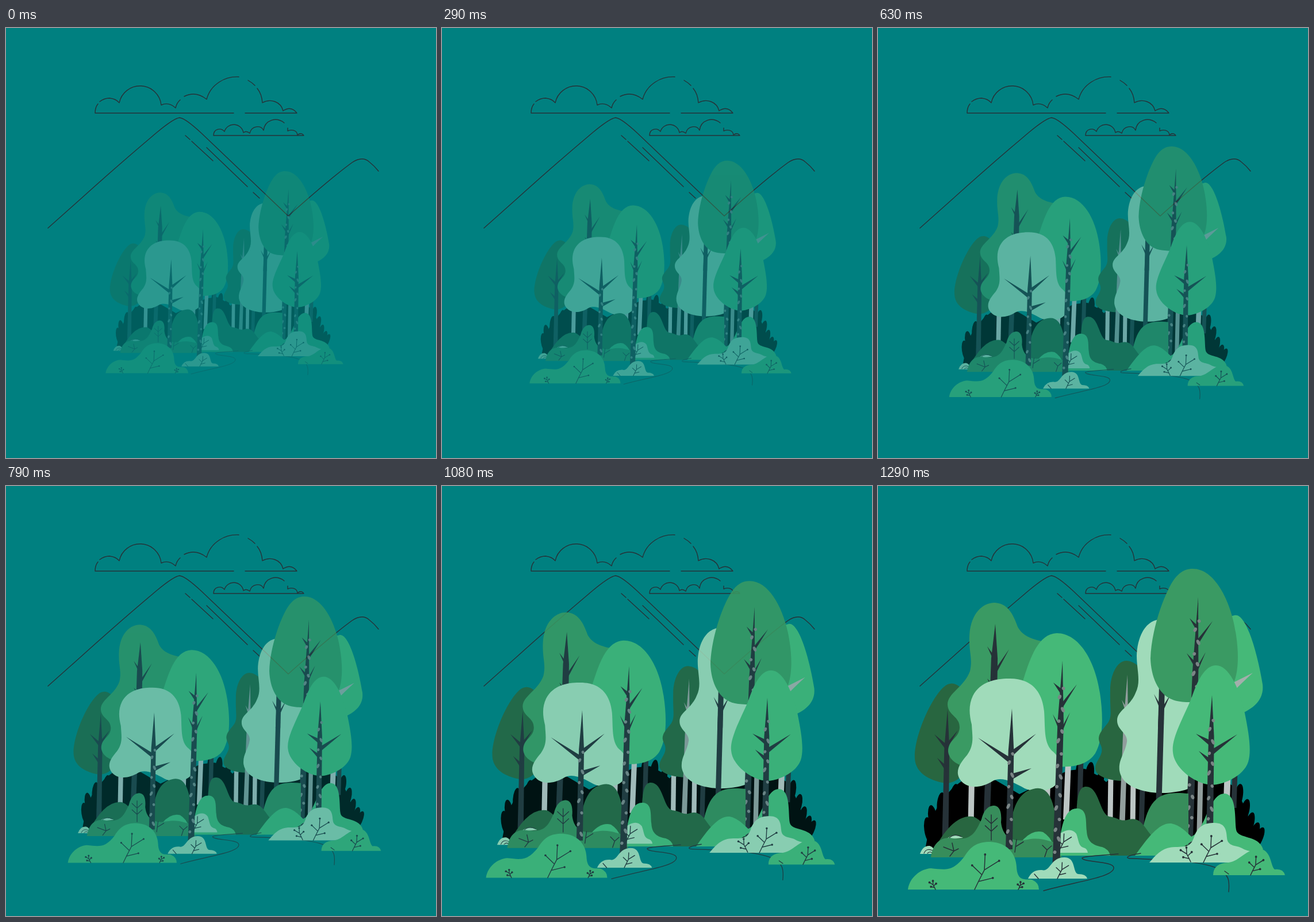
Write an HTML page that moves like this. It is 748 px wide and 748 px high and loops after 1330 ms.

```html
<!DOCTYPE html>
<html>
<head>
<meta charset="utf-8">
<style>
html, body { margin: 0; width: 100%; height: 100%; overflow: hidden; background: #008080 }
svg { display: block; width: 100vw; height: 100vh }
</style>
</head>
<body>
<svg viewBox="0 0 748 748"><g id="sky"></g><g id="forest"></g></svg>
<script>
const INK = '#263238', LIGHT = '#a0dbba', BRIGHT = '#45b978', MID = '#3a9a63',
      MOSS = '#378d5b', DARK = '#286640', PALE = '#bcc5c4', GREY = '#929e9d';

const shape = (color, d) => `<path fill="${color}" d="${d}"/>`;
const line = (d, w = 1.4) =>
  `<path fill="none" stroke="${INK}" stroke-width="${w}" stroke-linecap="round" stroke-linejoin="round" d="${d}"/>`;
const oval = (x, y, rx, ry, color, turn = 0) =>
  `<ellipse cx="${x}" cy="${y}" rx="${rx}" ry="${ry}" fill="${color}" transform="rotate(${turn} ${x} ${y})"/>`;

// Plain pole between two points
const pole = (x1, y1, x2, y2, w, color = INK) =>
  shape(color, `M${x1 - w / 2} ${y1}h${w}L${x2 + w / 2} ${y2}h${-w}Z`);

// Tapered trunk; each branch is [tip x, tip y, join y]
function trunk(tx, ty, bx, by, w, branches = [], spotsFrom = 0, color = INK) {
  const at = y => tx + (bx - tx) * (y - ty) / (by - ty);
  const my = ty + (by - ty) * .3, mx = at(my);
  let out = shape(color, `M${tx} ${ty}L${mx + w * .4} ${my}L${bx + w / 2} ${by}h${-w}L${mx - w * .4} ${my}Z`);
  for (const [x, y, jy] of branches)
    out += shape(color, `M${x} ${y}L${at(jy)} ${jy - 5}V${jy + 6}Z`);
  if (spotsFrom)
    for (let y = spotsFrom, k = 0; y < by - 8; y += 15 + k * 7 % 9, k++)
      out += oval(at(y) + (k % 2 ? -1 : 1) * w * .24, y, w * .22, 3 + k % 3, '#7b8586', k % 2 ? 25 : -25);
  return out;
}

// Small plant: bent stem with three side shoots
function sprig(x, y, h, flip = 1, dots = true) {
  const p = (u, v) => [x + u * h * flip, y + v * h];
  const ends = [[.3, -1], [.7, -.82], [.52, -.33], [-.07, -.69]].map(e => p(...e));
  const joins = [[.28, -.56], [.28, -.56], [.11, -.23], [.2, -.43]].map(j => p(...j));
  let d = `M${x} ${y}L${p(.11, -.23)}L${p(.28, -.56)}`;
  ends.forEach((e, k) => d += `M${joins[k]}L${e}`);
  return line(d, 1.5) + (dots ? ends.map(e => oval(e[0], e[1], 1.9, 1.9, INK)).join('') : '');
}

// Upright plant with paired shoots
const fern = (x, y, h) => line(`M${x} ${y}v${-h}` + [.35, .65].map(f =>
  `M${x - h * .24} ${y - h * (f + .22)}L${x} ${y - h * f}L${x + h * .24} ${y - h * (f + .22)}`).join(''), 1.5);

sky.innerHTML = line(`M73 348L128 299Q200 234 262 182Q292 157 302 156Q312 157 340 183L491 327Q565 261 602 234Q620 222 632 233Q641 240 648 249
  M312 187l8 7M323 197l37 34M349 208l71 68M430 286l11 10
  M155 148H396M416 148H506M155 148Q155 138 160 132M163 128Q171 122 180 122Q191 123 197 130A37 37 0 0 1 270 134Q283 128 295 139Q297 130 303 125
  M310 119Q330 109 349 124Q354 105 371 94Q386 84 405 85M421 91Q428 95 433 100M437 105Q445 115 446 130C460 122 478 128 482 144Q496 135 506 148
  M361 187H518M361 187C361 175 374 173 380 180A17 17 0 0 1 413 182Q418 178 424 183C427 170 444 168 448 178C450 160 470 154 484 165M490 174v5C498 176 506 178 507 186Q514 181 518 187`);

const blades = [[88, 598, -8], [95, 577, -8], [110, 555, 4], [133, 540, 8], [352, 503, -6], [368, 502, 8], [384, 518, 15],
  [397, 532, 18], [627, 540, 10], [638, 566, 14], [646, 589, 16], [654, 606, 20], [661, 614, 25]];

forest.innerHTML = [
  // undergrowth
  shape('#000', 'M82 632L92 580L108 550L130 525L150 510L205 512L246 536L330 495L360 492L385 505L403 520L420 500H570L615 520L634 550L650 590L662 622L640 632Z'),
  ...blades.map(([x, y, turn]) => oval(x, y, 7.5, 22, '#000', turn)),
  // rear poles
  pole(192, 500, 189, 580, 11), pole(163, 510, 161, 615, 10, PALE),
  pole(331, 480, 327, 580, 10, PALE), pole(353, 475, 351, 550, 9), pole(295, 515, 292, 615, 10, PALE),
  pole(405, 500, 404, 578, 9, PALE), pole(444, 515, 443, 590, 9, PALE), pole(460, 525, 458, 595, 9),
  pole(561, 510, 559, 600, 9, GREY), pole(608, 505, 606, 560, 11, PALE), pole(621, 495, 619, 560, 9),
  // left trees
  shape(DARK, 'M125 344C103 346 62 430 64 474C66 505 100 514 117 517C140 517 150 500 160 480V370Q140 340 125 344Z'),
  trunk(121, 388, 117, 612, 11, [[98, 432, 455], [103, 473, 492], [139, 425, 452]]),
  shape(MID, 'M203 203C180 203 160 225 159 262C158 290 165 300 160 322C150 350 121 360 121 380C122 400 142 400 142 420C141 440 122 440 122 462C124 480 145 488 160 490L260 480L290 271C262 266 250 258 243 245C235 222 225 204 203 203Z'),
  trunk(204, 240, 199, 440, 14, [[228, 284, 327], [190, 279, 301], [190, 335, 352]]),
  shape(BRIGHT, 'M311 256C350 256 378 305 386 360C392 400 392 440 378 465C365 485 340 490 310 488L240 440L250 345C262 310 275 257 311 256Z'),
  shape(LIGHT, 'M227 335C262 334 285 352 289 392C291 420 288 445 302 460C318 472 322 490 315 512C305 532 275 535 255 526C235 515 215 505 200 513C180 526 155 528 143 511C132 495 145 480 155 468C168 450 164 435 163 415C158 395 158 380 165 365C178 340 205 335 227 335Z'),
  // right trees
  shape(DARK, 'M432 304C415 304 404 330 404 355C403 390 408 400 400 412C390 425 384 430 384 440C385 450 391 452 389 463C386 475 378 480 378 492C379 505 400 512 425 513L460 500V320Q445 304 432 304Z'),
  trunk(434, 328, 424, 605, 10, [[424, 372, 390], [442, 370, 395]], 0, GREY),
  shape(LIGHT, 'M490 232C463 235 451 265 450 295C450 320 458 340 448 360C438 385 416 390 416 408C416 425 435 430 433 445C430 465 418 475 420 495C425 525 465 535 500 534C520 533 545 528 550 520V250Z'),
  pole(494, 348, 487, 605, 10), trunk(494, 345, 492, 420, 10, [[480, 362, 388], [509, 362, 393]]),
  shape(BRIGHT, 'M620 225C640 219 660 290 669 345C672 370 655 385 636 394L560 420V240Z'),
  shape('#a3afab', 'M652 325L618 342L612 330V364Q630 345 652 325Z'),
  shape(MID, 'M547 144C585 143 615 200 623 260C629 300 628 350 600 366C580 378 540 378 520 374C490 368 475 335 474 300C475 260 490 210 505 180C517 155 530 144 547 144Z'),
  trunk(557, 193, 541, 625, 13, [[582, 235, 274], [542, 230, 247], [570, 289, 325], [537, 291, 312]], 235),
  shape(BRIGHT, 'M588 312C610 312 628 350 638 395C645 430 650 460 644 480C636 505 600 520 580 520C550 518 515 490 513 463C510 440 530 405 545 370C555 340 568 312 588 312Z'),
  // rear bushes
  shape(DARK, 'M228 620C230 560 245 532 270 527C302 518 310 560 313 620Z'),
  shape(DARK, 'M92 643Q128 570 165 575Q180 580 190 600V643Z'),
  shape(MOSS, 'M458 610C470 540 490 530 540 535V625Z'),
  shape(DARK, 'M345 643C345 560 343 523 362 523C385 523 385 570 402 575C420 577 420 585 437 580C460 575 465 600 480 612L465 643Z'),
  shape(BRIGHT, 'M545 610C570 600 575 535 603 535C625 537 620 580 623 598C626 615 662 606 670 632L640 650H560Z'),
  trunk(581, 364, 577, 605, 12, [[625, 432, 464], [553, 431, 448], [558, 461, 480]], 408),
  shape(BRIGHT, 'M447 643C470 610 490 585 510 587C525 590 535 600 550 615L510 643Z'),
  shape(BRIGHT, 'M250 618Q268 597 287 602Q300 610 305 625Z'),
  shape(LIGHT, 'M73 640Q78 625 90 626Q98 628 100 640ZM118 615Q132 602 148 612Z'),
  line('M80 639Q84 629 95 634M86 639q4-4 8-1M124 612q9-8 21-2', 1.1),
  shape(MOSS, 'M92 646C95 625 105 612 125 612C165 620 170 600 180 580C185 560 195 556 202 556C215 557 215 575 214 585C217 612 235 620 260 615C285 610 300 620 310 620L320 646Z'),
  fern(197, 616, 44),
  line('M125 644l7-9l8-4M132 635l-18-7M132 635l-3-14M238 637l3-22M240 627l13-8M290 645l4-12l8-7M294 633l-8-8', 1.5),
  shape(BRIGHT, 'M314 643C318 570 333 560 348 561C365 563 361 585 363 600C364 620 375 625 390 628Q402 632 404 643Z'),
  shape(LIGHT, 'M312 638L316 605Q335 592 345 605C350 618 348 627 360 630Q364 632 365 638Z'),
  sprig(314, 637, 32, 1, false),
  // front trunks
  trunk(233, 387, 228, 632, 12, [[174, 438, 478], [275, 431, 466], [267, 491, 506]], 466),
  trunk(321, 304, 310, 657, 13, [[346, 345, 384], [305, 342, 358], [334, 394, 430], [304, 397, 425]], 352),
  // footpath
  line('M288 704C350 687 411 680 410 664C410 652 355 655 355 647C360 643 400 642 418 640M457 639C430 643 430 648 440 648C500 650 560 652 590 665C610 675 612 685 610 706'),
  // front bushes
  shape(LIGHT, 'M472 655C485 640 495 628 517 628C540 628 545 625 550 610C557 590 570 586 585 586C605 586 606 600 607 612C608 628 625 625 633 630C645 637 650 633 655 640L640 655Z'),
  sprig(566, 655, 46), sprig(544, 654, 25, -1),
  shape(BRIGHT, 'M583 677Q583 656 610 655C630 652 640 632 662 631C685 632 682 660 690 667Q705 665 708 677Z'),
  sprig(648, 677, 32), line('M603 670l7 5'),
  shape(BRIGHT, 'M52 702C55 680 75 666 92 665C120 668 130 670 150 645C162 625 175 619 195 619C225 620 240 640 241 662C242 690 258 683 268 685Q280 690 280 702Z'),
  sprig(168, 702, 61), sprig(100, 702, 15, -1), sprig(244, 702, 13),
  shape(LIGHT, 'M261 683Q268 667 285 668C300 672 300 646 324 646C345 646 338 672 348 675Q362 675 364 683Z'),
  sprig(312, 683, 28, 1, false), line('M272 675l7 8')
].join('');

const LOOP = 1330, STEPS = 31, FPS = 24, CX = 380, CY = 428;

function draw(now) {
  const step = Math.floor((now % LOOP + 4.9) * FPS / 1000);
  const u = Math.min(step / STEPS, 1);
  const p = u * (.7 + .3 * u);
  const scale = .63 + .37 * p;
  forest.setAttribute('transform', `translate(${CX} ${CY}) scale(${scale}) translate(${-CX} ${-CY})`);
  forest.setAttribute('opacity', .27 + .73 * p);
}

const start = performance.now();
(function tick() {
  draw(performance.now() - start);
  requestAnimationFrame(tick);
})();
</script>
</body>
</html>
```
